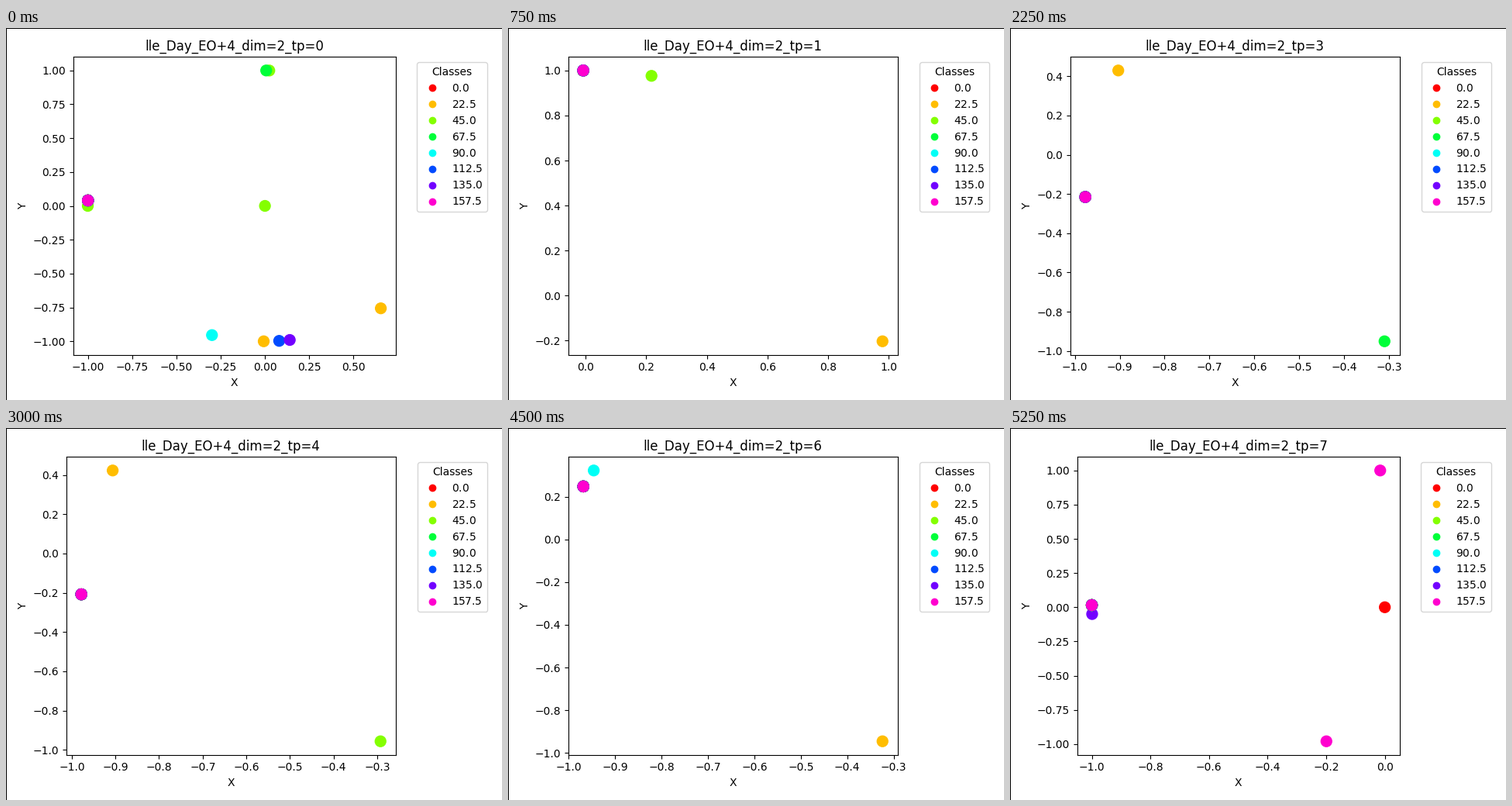
Recreate the animation shown at these times as a matplotlib script. Size 640 px wide and 480 px high, loop 6 s.

```python
import numpy as np
import matplotlib.pyplot as plt
from matplotlib.animation import FuncAnimation
from matplotlib.lines import Line2D
from matplotlib.transforms import IdentityTransform

W, H = 640, 480
RED, ORANGE, LIME, GREEN, CYAN, BLUE, PURPLE, MAGENTA = CLASSES = np.arange(8) * 22.5
ORIGIN = None

# Each step: bearing of the dense cluster, then (class, bearing) of the outliers.
# Bearings are degrees on the unit circle.
STEPS = [
    (177.7, [(LIME, 180), (LIME, ORIGIN), (LIME, 88.6), (GREEN, 89.6),
             (ORANGE, -49.15), (ORANGE, -90.4), (CYAN, -107.4),
             (BLUE, -85.4), (PURPLE, -81.95)]),
    (90.45, [(LIME, 77.45), (ORANGE, -11.7)]),
    (168.0, [(LIME, 161.0), (ORANGE, 252.5)]),
    (192.44, [(ORANGE, 154.57), (GREEN, 251.94)]),
    (192.0, [(ORANGE, 155.0), (LIME, 253.0)]),
    (198.97, [(RED, 182.2), (ORANGE, 152.0), (CYAN, 101.2), (LIME, 258.05)]),
    (165.58, [(CYAN, 161.1), (ORANGE, 251.1)]),
    (179.1, [(RED, ORIGIN), (PURPLE, 182.85), (MAGENTA, 90.9), (MAGENTA, 258.5)]),
]

fig, ax = plt.subplots(figsize=(W / 100, H / 100), dpi=100)
# Thin black edge along the left and top of the stage.
fig.add_artist(Line2D([0.5, 0.5, W], [0, H - 0.5, H - 0.5],
                      color="black", lw=0.72, snap=False,
                      solid_joinstyle="miter", transform=IdentityTransform()))


def place(bearing):
    if bearing is ORIGIN:
        return 0.0, 0.0
    a = np.radians(bearing)
    return np.cos(a), np.sin(a)


def update(step):
    cluster, outliers = STEPS[step]
    points = outliers + [(c, cluster) for c in CLASSES] * 3
    xy = np.array([place(b) for _, b in points])

    ax.clear()
    dots = ax.scatter(xy[:, 0], xy[:, 1], c=[c for c, _ in points],
                      s=100, cmap="hsv", vmin=0, vmax=180)
    ax.set_title(f"lle_Day_EO+4_dim=2_tp={step}")
    ax.set_xlabel("X")
    ax.set_ylabel("Y")
    ax.legend(*dots.legend_elements(), title="Classes",
              bbox_to_anchor=(1.05, 1), loc="upper left")
    # Start from the default margins so the layout depends on this step only.
    fig.subplots_adjust(left=0.125, right=0.9, bottom=0.11, top=0.88)
    fig.tight_layout()
    return []


anim = FuncAnimation(fig, update, frames=len(STEPS), interval=750,
                     init_func=lambda: update(0), repeat=True, repeat_delay=0)
plt.show()
```
